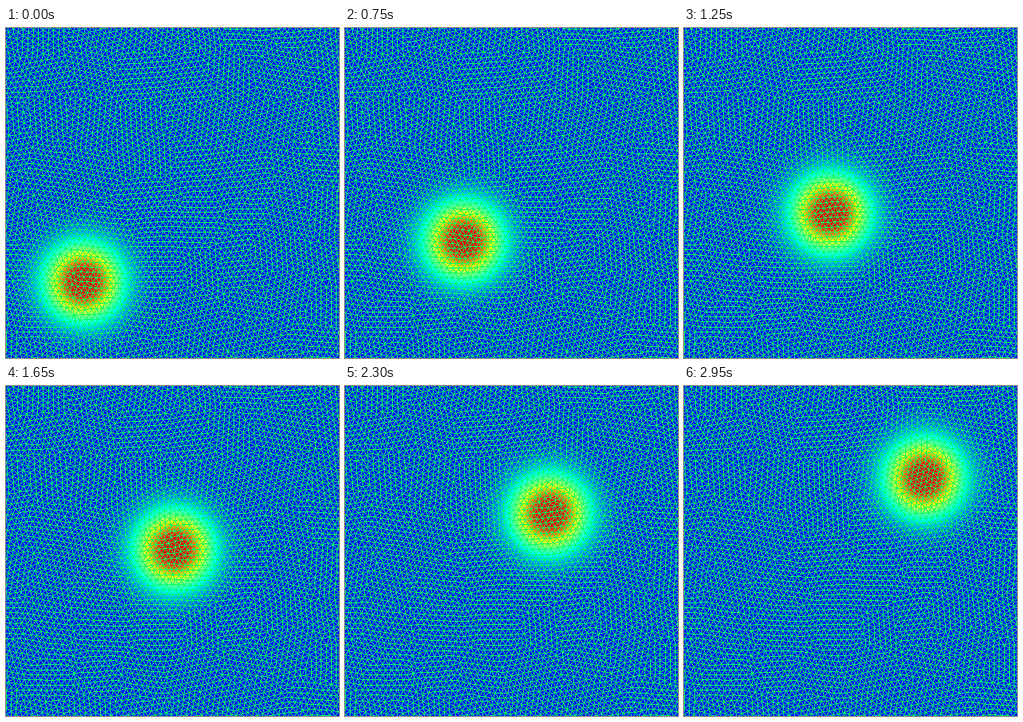
Recreate the animation shown at these times as an HTML page with a canvas. Size 417 px wide and 413 px high, loop 3000 ms.

```html
<!DOCTYPE html>
<html lang="en">
<head>
<meta charset="utf-8">
<title>Moving Gaussian on a triangle mesh</title>
<style>
html, body { margin: 0; width: 100%; height: 100%; overflow: hidden; background: #0014ff }
canvas { display: block }
</style>
</head>
<body>
<canvas id="stage" width="417" height="413"></canvas>
<script>
const W = 417, H = 413, EDGE = 7.2, PAD = 24, CELL = 58;
const ctx = stage.getContext('2d');

let seed = 7;
const random = () => (seed = seed * 16807 % 2147483647) / 2147483647;
const spread = size => (random() - .5) * size;
const dist2 = (a, b) => (a.x - b.x) ** 2 + (a.y - b.y) ** 2;
const clamp = v => Math.max(0, Math.min(1, v));

// Centres of patches of regular triangles, each with its own row angle
function makePatches() {
  const patches = [];
  for (let y = 0; y < H + CELL; y += CELL) {
    for (let x = 0; x < W + CELL; x += CELL) {
      patches.push({ x: x + spread(40), y: y + spread(40), angle: random() * Math.PI / 3 });
    }
  }
  return patches;
}

function makePoints() {
  const patches = makePatches(), points = [];
  for (const patch of patches) {
    const cos = Math.cos(patch.angle), sin = Math.sin(patch.angle);
    for (let row = -16; row <= 16; row++) {
      for (let col = -14; col <= 14; col++) {
        const u = (col + (row & 1) / 2) * EDGE, v = row * EDGE * .866;
        const p = {
          x: patch.x + u * cos - v * sin + spread(1.6),
          y: patch.y + u * sin + v * cos + spread(1.6)
        };
        if (p.x < -PAD || p.x > W + PAD || p.y < -PAD || p.y > H + PAD) continue;
        const own = dist2(p, patch);
        if (patches.some(other => dist2(p, other) < own)) continue;
        if (points.every(q => dist2(p, q) > (.68 * EDGE) ** 2)) points.push(p);
      }
    }
  }
  return points;
}

function link(points, reach) {
  points.forEach(p => p.near = []);
  points.forEach((p, i) => {
    p.id = i;
    for (let j = 0; j < i; j++) {
      const q = points[j];
      if (dist2(p, q) < reach * reach) {
        p.near.push(q);
        q.near.push(p);
      }
    }
  });
}

// Push neighbours apart until the patches join smoothly
function relax(points, rounds) {
  const range = 1.2 * EDGE;
  while (rounds--) {
    for (const p of points) {
      p.dx = p.dy = 0;
      for (const q of p.near) {
        const d = Math.sqrt(dist2(p, q)) || 1;
        if (d < range) {
          const push = (range - d) * .12 / d;
          p.dx += (p.x - q.x) * push;
          p.dy += (p.y - q.y) * push;
        }
      }
    }
    for (const p of points) {
      if (p.x < -12 || p.x > W + 12 || p.y < -12 || p.y > H + 12) continue;
      p.x += p.dx;
      p.y += p.dy;
    }
  }
}

// Delaunay edges, found from empty circles among near points
function findEdges(points) {
  const edges = new Map();
  const add = (a, b) => edges.set(a.id * 10000 + b.id, [a, b]);
  for (const a of points) {
    const later = a.near.filter(q => q.id > a.id);
    for (const b of later) for (const c of later) {
      if (c.id <= b.id) continue;
      const bx = b.x - a.x, by = b.y - a.y, cx = c.x - a.x, cy = c.y - a.y;
      const det = 2 * (bx * cy - by * cx);
      if (Math.abs(det) < 1) continue;
      const bb = bx * bx + by * by, cc = cx * cx + cy * cy;
      const ux = (cy * bb - by * cc) / det, uy = (bx * cc - cx * bb) / det;
      const r2 = ux * ux + uy * uy;
      if (r2 > (1.2 * EDGE) ** 2) continue;
      const centre = { x: a.x + ux, y: a.y + uy };
      if (a.near.some(q => q !== b && q !== c && dist2(q, centre) < r2 - 1e-6)) continue;
      add(a, b);
      add(a, c);
      add(b, c);
    }
  }
  return edges.values();
}

function drawMesh() {
  const points = makePoints();
  link(points, 2.2 * EDGE);
  relax(points, 14);
  link(points, 2.4 * EDGE);
  const layer = document.createElement('canvas');
  layer.width = W;
  layer.height = H;
  const pen = layer.getContext('2d');
  pen.fillStyle = '#00ff64';
  for (const [a, b] of findEdges(points)) {
    const x0 = Math.round(a.x), y0 = Math.round(a.y);
    const dx = Math.round(b.x) - x0, dy = Math.round(b.y) - y0;
    const steps = Math.max(Math.abs(dx), Math.abs(dy));
    for (let i = 0; i <= steps; i++) {
      pen.fillRect(Math.round(x0 + dx * i / steps), Math.round(y0 + dy * i / steps), 1, 1);
    }
  }
  return layer;
}

// Gaussian height at a radius, shown on a blue-cyan-yellow-red scale
function heatColor(r) {
  const v = Math.min(.9, .145 + .82 * Math.exp(-r * r / 2200));
  const rgb = [3, 2, 1].map(peak => Math.round(255 * clamp(1.5 - Math.abs(4 * v - peak))));
  return `rgb(${rgb})`;
}

const RADIUS = 110, STOPS = 44, FRAMES = 60;
const mesh = drawMesh();

function draw(now) {
  const part = Math.floor(now / 50) % FRAMES / (FRAMES - 1);
  const x = 97 + 204 * part, y = 318 - 203 * part;
  const heat = ctx.createRadialGradient(x, y, 0, x, y, RADIUS);
  for (let i = 0; i <= STOPS; i++) heat.addColorStop(i / STOPS, heatColor(RADIUS * i / STOPS));
  ctx.fillStyle = heat;
  ctx.fillRect(0, 0, W, H);
  ctx.drawImage(mesh, 0, 0);
}

const start = performance.now();
function tick() {
  draw(performance.now() - start);
  requestAnimationFrame(tick);
}
tick();
</script>
</body>
</html>
```
